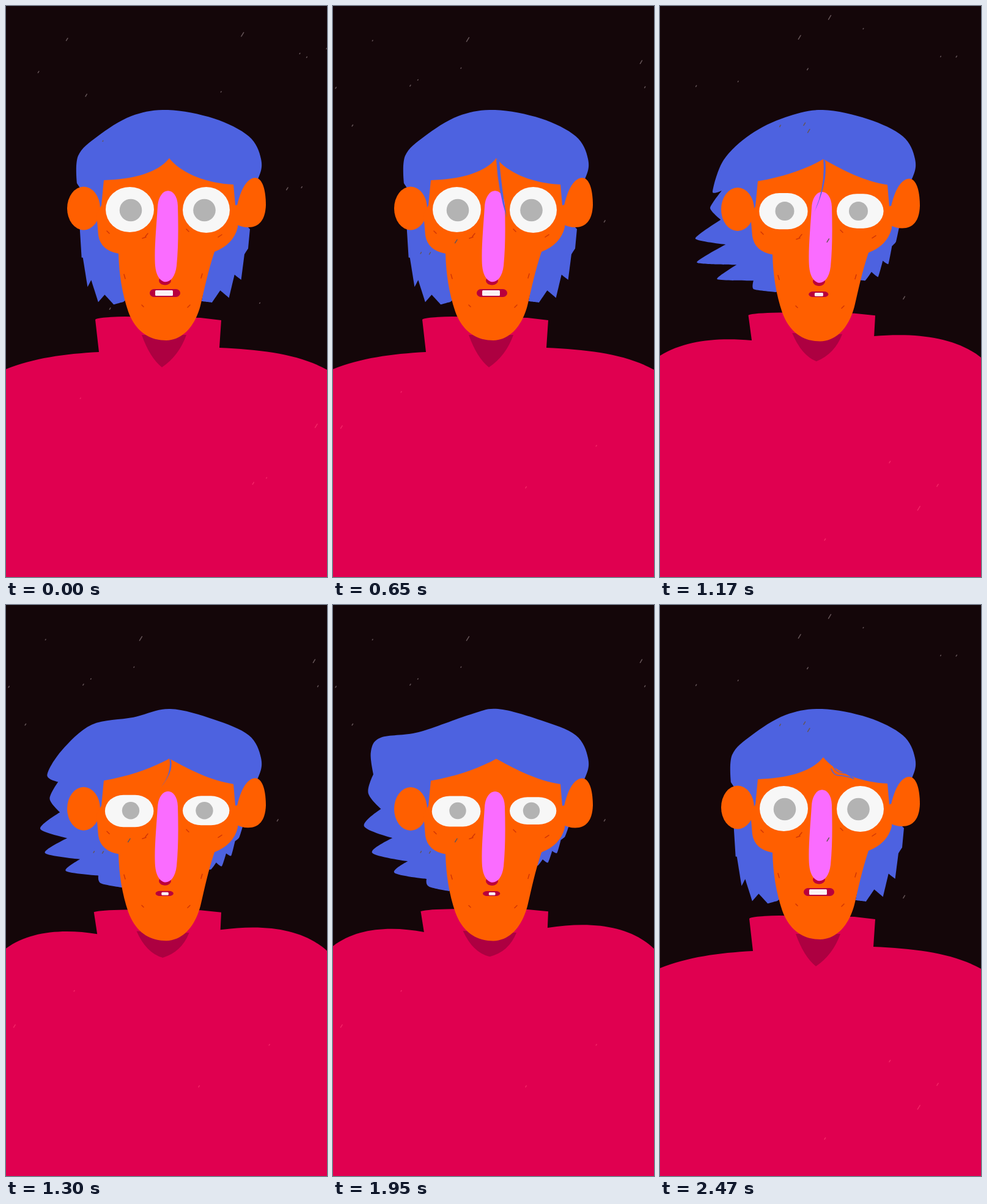
Animation, 525 px wide and 934 px high, one loop 2600 ms. Source, as an HTML page:

```html
<!DOCTYPE html>
<html lang="en">
<head>
<meta charset="utf-8">
<title>Windy portrait</title>
<style>
  html, body { margin: 0; width: 100%; height: 100%; overflow: hidden; background: #140609; }
  svg { display: block; width: 100vw; height: 100vh; }
  .blue { fill: #4d62e0; }
  .skin { fill: #ff5f00; }
  .line { fill: none; stroke-linecap: round; stroke-width: 1.5; }
</style>
</head>
<body>
<svg viewBox="0 0 525 934" preserveAspectRatio="none">
  <rect width="525" height="934" fill="#140609"/>
  <path id="hair" class="blue"/>
  <path id="locks" class="blue"/>
  <path id="body" fill="#e00050"/>
  <path id="shade" fill="#ad0041"/>
  <g id="head">
    <ellipse class="skin" cx="127" cy="331" rx="27" ry="35.5"/>
    <path class="skin" d="M378 326C384 300 394 281 408 281C421 282 425 305 425 326C424 350 414 362 396 362Q385 362 374 356Z"/>
    <path id="face" class="skin"/>
    <path class="line" stroke="#d23505" d="M165 368l4 4M223 380l6-2M228 377l4-5M295 365l4 4M347 378l6-4M193 439l2 7M321 438l-2 7M222 489l3 3M297 493l4-4"/>
    <ellipse cx="260" cy="449" rx="10" ry="7.5" fill="#bd0038"/>
    <path fill="#fa6cff" d="M248 328C250 294 280 294 281 327C282 360 282 395 279 425C275 460 247 460 244 425C242 400 246 360 248 328Z"/>
  </g>
  <g fill="#f7f7f7"><rect id="eyeL"/><rect id="eyeR"/></g>
  <g fill="#b3b3b3"><circle id="irisL" cx="204"/><circle id="irisR" cx="324.5"/></g>
  <rect id="lips" fill="#b8003c"/>
  <rect id="teeth" fill="#fbf3f5"/>
  <path id="strand" class="blue"/>
  <path id="curl" class="line" stroke="#4d62e0" d="M280 268Q284 280 296 279Q310 281 317 284M284 265Q290 276 304 275L316 283"/>
  <path id="dust" class="line" stroke="#655558"/>
  <path id="glint" class="line" stroke="#f42467"/>
</svg>
<script>
const STEP = 130, SLOTS = 20, CALM_END = 5, PEAK = 12, REST = 19;
const set = (id, attrs) => {
  for (const k in attrs) document.getElementById(id).setAttribute(k, attrs[k]);
};
const lerp = (a, b, t) => a + (b - a) * t;
const blend = (a, b, t) => a.map((v, i) => lerp(v, b[i], t));

// Blends two path strings that share one layout.
function mix(a, b, t) {
  const to = b.match(/\d+/g);
  let i = 0;
  return a.replace(/\d+/g, n => lerp(+n, +to[i++], t).toFixed(2));
}

// Wind builds up to the peak, then dies down smoothly.
function windAt(slot) {
  if (slot <= CALM_END) return 0;
  if (slot <= PEAK) return ((slot - CALM_END) / (PEAK - CALM_END)) ** 1.7;
  const t = (REST - slot) / (REST - PEAK);
  return t ** 3 * (t * (6 * t - 15) + 10);
}

// Left side of the hair: three crown points, first tip, edge (start, bend, end), spike.
const calm = [205, 180, 150, 213, 118, 245, 116, 290, 124, 302, 105, 470, 192, 484, 2, 28];
const blown = [
  [0, calm],
  [CALM_END, calm],
  [9, [205, 182, 148, 210, 104, 252, 86, 304, 101, 302, 85, 430, 190, 468, -55, 12]],
  [PEAK, [215, 187, 125, 167, 66, 209, 30, 226, 54, 264, 75, 410, 190, 450, -28, -6]],
  [15, [225, 179, 140, 208, 78, 217, 62, 240, 66, 277, 90, 430, 190, 468, -45, 4]],
  [17, [200, 180, 140, 214, 107, 270, 78, 320, 107, 314, 120, 450, 192, 482, -24, 28]],
  [REST, calm]
];
function hairAt(slot) {
  const i = Math.max(1, blown.findIndex(k => k[0] >= slot));
  const [from, a] = blown[i - 1], [to, b] = blown[i];
  return blend(a, b, (slot - from) / (to - from));
}

// Tips stand off a quadratic edge, longest in the middle.
function fringe([ax, ay, bx, by, cx, cy, dx, dy], count) {
  const on = t => [lerp(lerp(ax, bx, t), lerp(bx, cx, t), t), lerp(lerp(ay, by, t), lerp(by, cy, t), t)];
  const points = [[ax, ay, 0]];
  for (let i = 0; i < count; i++) {
    const t = (i + .5) / count, [x, y] = on(t), reach = Math.sin(Math.PI * t);
    points.push([x + dx * reach, y + dy * reach, 'tip'], [...on((i + 1) / count), 0]);
  }
  return points;
}

// Closed curve through [x, y, smoothness]; tips grow rounder with the wind.
function outline(points, round) {
  const n = points.length;
  const slope = i => {
    const p = points[(i + n - 1) % n], q = points[(i + 1) % n], s = points[i][2];
    const k = (s === 'tip' ? round : s) / 6;
    return [(q[0] - p[0]) * k, (q[1] - p[1]) * k];
  };
  return points.reduce((d, p, i) => {
    const j = (i + 1) % n, q = points[j], m = slope(i), o = slope(j);
    return d + `C${p[0] + m[0]} ${p[1] + m[1]} ${q[0] - o[0]} ${q[1] - o[1]} ${q[0]} ${q[1]}`;
  }, `M${points[0][0]} ${points[0][1]}`) + 'Z';
}

function drawHair(slot, wind) {
  const h = hairAt(slot);
  const crown = [
    [380, 335, 0], [412, 283, 1], [417, 250, 1], [397, 213, 1],
    [340, 184 + 18 * wind ** 3, 1], [lerp(265, 285, wind ** 3), 170, 1],
    [h[0], h[1], 1], [h[2], h[3], 1], [h[4], h[5], 1], [h[6], h[7], 'tip']
  ];
  set('hair', { d: outline([...crown, ...fringe(h.slice(8), 5)], wind * 1.6) });
  const right = blend([399, 365, 388, 455, 320, 483, 2, 26], [378, 360, 345, 385, 330, 392, 0, 5], wind);
  set('locks', { d: outline([[335, 395, 0], [385, 350, 0], ...fringe(right, 4)], wind) });
}

function drawBody(wind) {
  set('body', {
    d: mix('M0 934V594C45 576 95 569 152 566L146 513Q148 509 195 508L318 510L352 514L349 559C420 562 480 570 525 595V934Z',
      'M0 934V537C35 500 95 499 147 517L142 494Q160 491 195 491L318 491L352 494L352 510C430 490 490 500 525 543V934Z', wind)
  });
  set('shade', {
    d: mix('M222 538Q235 575 255 591Q283 572 295 538Z', 'M207 530Q225 565 257 566Q290 565 303 535Z', wind)
  });
}

function box(id, [x, y, width, height], radius) {
  set(id, { x, y, width, height, rx: radius, ry: Math.min(radius, height / 2) });
}

function drawFace(wind) {
  const dy = 4 * wind, top = -.6 * dy, flat = Math.min(1, wind * 2.5);
  set('head', { transform: `translate(0 ${dy})` });
  const left = mix('C252 268 220 283 160 285', 'C240 264 205 277 160 285', flat);
  const right = mix('C325 290 285 272 267 249', 'C330 284 295 264 267 249', flat);
  set('face', {
    d: `M267 249${left}L156 326L148 340L151 375Q155 400 184 405C185 440 190 470 200 500` +
      'C212 533 235 547 262 547C292 546 310 520 318 490C325 460 330 435 341 402' +
      `Q372 390 379 362L380 325L375 326L372 ${292 + top}${right}Z`
  });
  const corner = lerp(39.5, 23, wind);
  box('eyeL', blend([163, 296, 79, 74], [161, 322, 80, 36], wind), corner);
  box('eyeR', blend([289, 296, 77, 75], [289, 325, 76, 27], wind), corner);
  const iris = { cy: 334 + dy, r: lerp(18.3, 11, wind) };
  set('irisL', iris);
  set('irisR', iris);
  const pinch = wind ** .4;
  box('lips', blend([235, 463, 50, 13], [247, 469, 24, 7], pinch), 7);
  box('teeth', blend([244, 465, 29, 9], [257, 471, 7, 4], pinch), 1.5);
}

// A loose strand drops from the parting and swings across the nose.
function drawStrand(slot) {
  const size = Math.min(1, (slot - 2) / 3, (11 - slot) / 2);
  const x = lerp(268, 329 - 9 * slot, size), y = 250 + 96 * size, w = 10 - .8 * slot;
  set('strand', {
    d: size > 0 ? `M267 250Q${267 + slot / 2} ${250 + 50 * size} ${x} ${y}Q${267 + slot / 2 + w} ${250 + 45 * size} ${269 + w / 2} 254Z` : ''
  });
  set('curl', { visibility: slot === REST ? 'visible' : 'hidden' });
}

function random(seed) {
  return () => (seed = seed * 16807 % 2147483647) / 2147483647;
}

// Five scatterings of specks repeat in turn.
function drawSpecks(slot) {
  const rnd = random(Math.max(2, slot) % 5 * 7919 + 4321);
  rnd();
  const scatter = (count, top, height) => Array.from({ length: count }, () => {
    const size = 1 + 6 * rnd() ** 2;
    return `M${rnd() * 525} ${top + rnd() * height}l${size * .6} ${-size}`;
  }).join('');
  set('dust', { d: scatter(8, 18, 140) + scatter(5, 160, 390) });
  set('glint', { d: scatter(4, 610, 290) });
}

function draw(slot) {
  const wind = windAt(slot);
  drawHair(slot, wind);
  drawBody(wind);
  drawFace(wind);
  drawStrand(slot);
  drawSpecks(slot);
}

const start = performance.now();
let shown = -1;
function tick() {
  const slot = Math.floor((performance.now() - start) / STEP) % SLOTS;
  if (slot !== shown) draw(shown = slot);
  requestAnimationFrame(tick);
}
tick();
</script>
</body>
</html>
```
